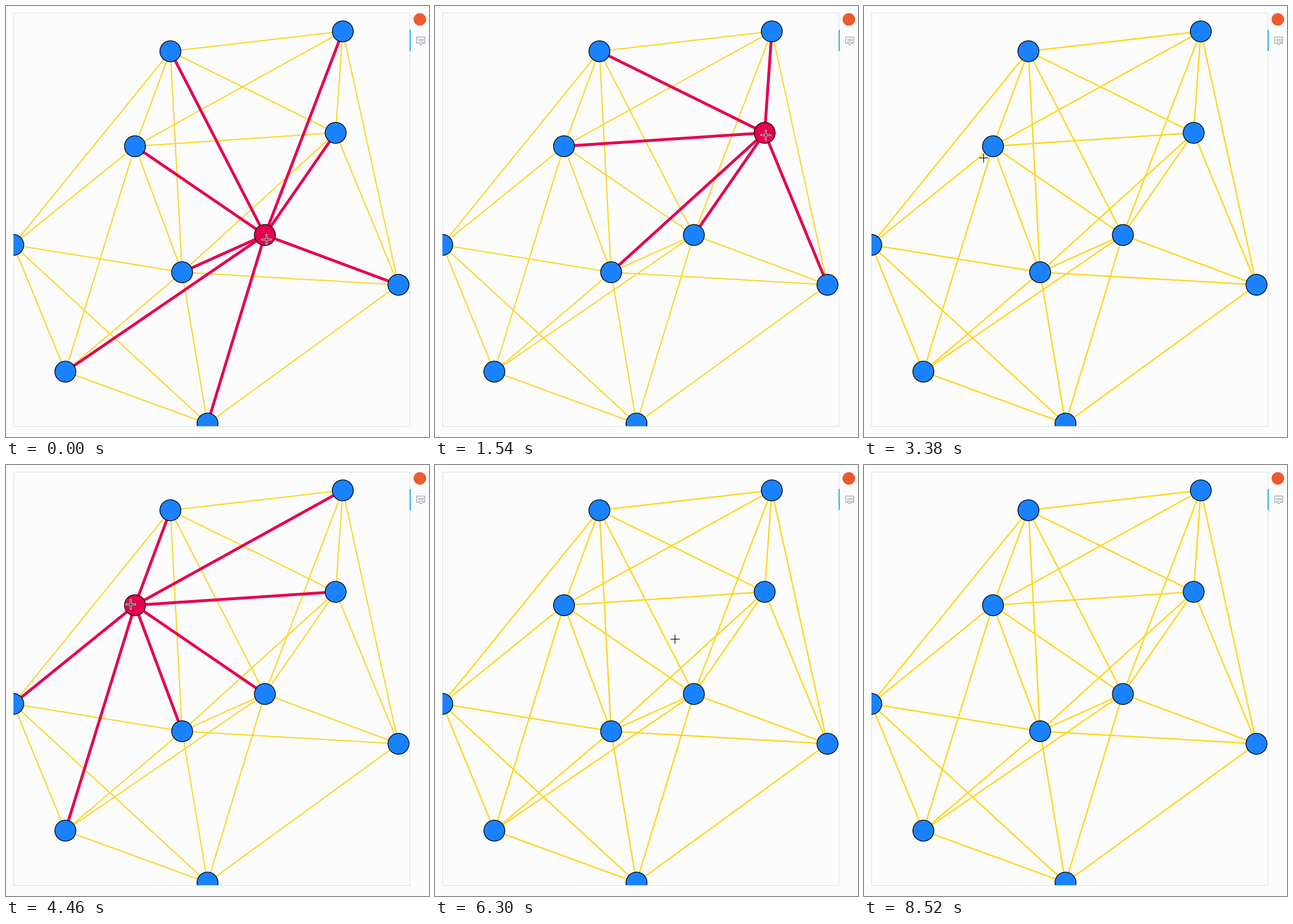
A matplotlib script that plays this animation: 741x756 px, repeating every 8620 ms.

```python
from itertools import combinations

import matplotlib.pyplot as plt
import numpy as np
from matplotlib.animation import FuncAnimation
from matplotlib.collections import LineCollection
from matplotlib.patches import Circle, Polygon, Rectangle

W, H, DPI = 741, 756, 64
STEP, LOOP = 20, 8620
GOLD, PALE, PINK, BLUE = "#ffd61f", "#fbd62c", "#e6004f", "#1a82ff"
GREY = "#989eab"
LEFT, TOP, RIGHT, BOTTOM = 12.5, 11.5, 706.8, 736.8
RADIUS, REACH = 18.4, 17

NODES = [(288, 79.4), (590, 44.5), (577.5, 222.5), (226, 246), (12.7, 419),
         (453.5, 401.7), (308.5, 467), (687.5, 489), (104, 641.4), (353, 732.5)]

# Pointer stops: tick, x, y
STOPS = [(2, 456, 409), (17, 592, 245), (19, 579, 226), (58, 579, 226),
         (59, 512, 220), (73, 209, 266), (76, 218, 244), (119, 218, 244),
         (135, 420, 305), (175, 420, 305), (181, 740, 270)]


def px(v):
    return v * 72 / DPI


def near(a, b):
    # The data's vertical scale is a little tighter than the horizontal one
    return np.hypot(a[0] - b[0], 0.866 * (a[1] - b[1])) < 437


def tick_at(ms):
    # Ticks last 20, 100 and 20 ms in turn
    cycle, rest = divmod(ms, 140)
    return 3 * cycle + (rest >= 20) + (rest >= 120)


def pointer(tick):
    tick = np.clip(tick, STOPS[0][0], STOPS[-1][0])
    for (t0, *p), (t1, *q) in zip(STOPS, STOPS[1:]):
        if tick <= t1:
            u = (tick - t0) / (t1 - t0)
            return np.array(p) + np.subtract(q, p) * u * u * (3 - 2 * u)


def hovered(tick):
    # The highlight trails the pointer by one tick
    x, y = pointer(tick - 1)
    return next((n for n in NODES if np.hypot(n[0] - x, n[1] - y) < REACH), None)


EDGES = [pair for pair in combinations(NODES, 2) if near(*pair)]

fig = plt.figure(figsize=(W / DPI, H / DPI), dpi=DPI, facecolor="#fcfcfc")
ax = fig.add_axes([0, 0, 1, 1])
ax.set(xlim=(0, W), ylim=(H, 0))
ax.axis("off")

box = (LEFT, TOP), RIGHT - LEFT, BOTTOM - TOP
ax.add_patch(Rectangle(*box, fill=False, ec="#dcdcea", lw=px(1)))
clip = Rectangle(*box, transform=ax.transData)

edges = LineCollection(EDGES, capstyle="butt", zorder=2)
links = LineCollection([], colors=PINK, linewidths=px(5), capstyle="butt",
                       zorder=3)
for lines in (edges, links):
    ax.add_collection(lines, autolim=False)
    lines.set_clip_path(clip)

dots = {}
for pos in NODES:
    dots[pos] = ax.add_patch(
        Circle(pos, RADIUS, fc=BLUE, ec="black", lw=px(1.3), zorder=4))
    dots[pos].set_clip_path(clip)

# Toolbar
ax.add_patch(Circle((725, 23.5), 11, fc="#ee5a30", lw=0))
ax.add_patch(Rectangle((706.8, 42), 2.2, 36.5, fc="#26aae1", lw=0, zorder=3))
bubble = [(719.5, 54.5), (733.5, 54.5), (733.5, 65.5), (729, 65.5),
          (726.5, 68.5), (724, 65.5), (719.5, 65.5)]
ax.add_patch(Polygon(bubble, fill=False, ec=GREY, lw=px(1.2),
                     joinstyle="round"))
for y in (57.5, 60, 62.5):
    ax.plot([722, 731], [y, y], color=GREY, lw=px(1))

cross = [ax.plot([], [], color=c, lw=px(w), solid_capstyle="butt", zorder=z)[0]
         for c, w, z in (("white", 3, 5), ("#111111", 1.3, 6))]


def draw(i):
    tick = tick_at(i * STEP)
    node = hovered(tick)
    for pos, dot in dots.items():
        dot.set_facecolor(PINK if pos == node else BLUE)
    links.set_segments([e for e in EDGES if node in e])
    edges.set_color(PALE if node else GOLD)
    edges.set_linewidth(px(2.2 if node else 2.5))

    x, y = np.round(pointer(tick)) - 0.5
    for line, arm in zip(cross, (9, 8)):
        line.set_data([x - arm, x + arm, np.nan, x, x],
                      [y, y, np.nan, y - arm, y + arm])
        line.set_visible(bool(x < RIGHT))
    return [edges, links, *dots.values(), *cross]


anim = FuncAnimation(fig, draw, frames=LOOP // STEP, interval=STEP,
                     repeat=True, repeat_delay=0)
plt.show()
```
